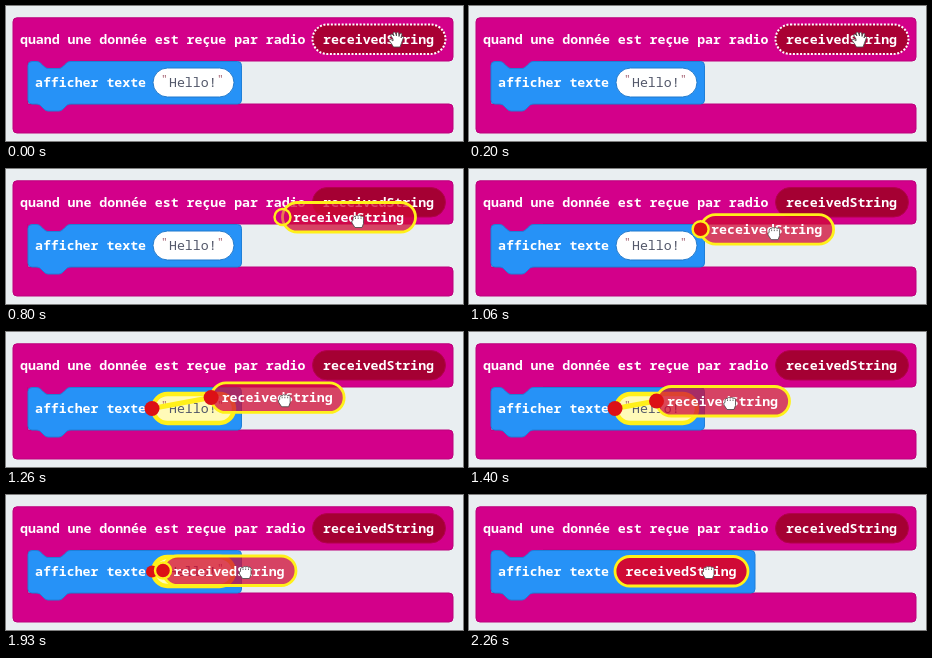
Recreate the animation shown at these times as an HTML page. Size 457 by 135 pixels, loop 2330 ms.

```html
<!DOCTYPE html>
<html lang="fr">
<head>
<meta charset="utf-8">
<style>
  html, body { margin: 0; width: 100%; height: 100%; overflow: hidden; background: #e9eef1; }
  svg { display: block; width: 457px; height: 135px; }
  text { font: 700 13.22px "Noto Sans Mono", "DejaVu Sans Mono", monospace; fill: #fff; white-space: pre; }
  .value { font-weight: 500; fill: #53586a; }
  .quote { font-size: 11px; font-weight: 400; fill: #a0596a; }
  .glow { stroke: #fff01a; }
  .hand { fill: #fff; stroke: #444; stroke-width: .8; stroke-linejoin: round; }
</style>
</head>
<body>
<svg viewBox="0 0 457 135">
  <path fill="#d3008a" stroke="#bd007c" d="M11 11.8H443q4 0 4 4V51q0 4-4 4H22V98H443q4 0 4 4V123q0 4-4 4H11q-4 0-4-4V15.8q0-4 4-4Z"/>
  <path fill="#d3008a" d="M22 54H74V66H22Z"/>
  <text x="14" y="38">quand une donnée est reçue par radio</text>
  <rect id="homePill" x="306.5" y="18.5" width="133" height="29.5" rx="14.75" fill="#a90034"/>
  <text x="317" y="38">receivedString</text>

  <path id="blue" fill="#2692f7" stroke="#1f7fd8"/>
  <text x="29" y="81">afficher texte</text>
  <g id="socket">
    <rect id="field" x="147" y="62" width="81" height="29" rx="14.5"/>
    <text class="quote" x="155" y="77">"</text>
    <text class="value" x="163" y="81">Hello!</text>
    <text class="quote" x="211" y="77">"</text>
  </g>

  <path id="link" class="glow" stroke-width="5"/>
  <circle id="goal" cx="146" cy="76.5" fill="#dc1016"/>
  <g id="drag">
    <rect id="dragPill" class="glow" x="306.5" y="18.5" width="133" height="29.5" rx="14.75" fill="#d00a36" stroke-width="2.8"/>
    <text x="317" y="38">receivedString</text>
    <circle id="plug" class="glow" cx="306.5" cy="33"/>
  </g>

  <g id="cursor">
    <path id="open" class="hand" d="M-3-1 -5-4q-1-2 1-2l2 2-1-3q1-2 2.500 0l1 3V-7q1-1.500 2.200 0l.3 3.500 1-3q1.500-1 2 .5L5-2 6-3.500q1.500-.5 1.500 1L5.500 3 4 7H-2.500L-5 3-7 .5q0-2 2-1l2 1.500Z"/>
    <path id="fist" class="hand" d="M-5-3q1-2.500 2.500-1.500 1-2 2.700-.5 1.500-1.500 2.700.3 2-1 2.600 1V2.500L4 6.500H-3L-6 2q-1-2.500 1-2.500Z M-2.500-3.500V-2M.2-3.500V-2M3-3.500V-2"/>
  </g>
</svg>
<script>
const LOOP = 2330, STEP = 1000 / 15;
const PICK = 590, FILL = 930, LINK = 1200, CLOSE = 1640, DROP = 2060;

// time, x, y
const handPath = [
  [560, 390, 34], [800, 352, 52], [1060, 306, 64],
  [1400, 261, 71], [1520, 248, 75], [1660, 239.5, 77]
];
const dragPath = [
  [590, 0, 0], [800, -30, 15], [1060, -74, 27],
  [1400, -119, 36], [1540, -137, 40], [1700, -149.5, 42.5]
];

const el = {};
document.querySelectorAll("[id]").forEach(node => el[node.id] = node);

function set(node, attrs) {
  for (const key in attrs) node.setAttribute(key, attrs[key]);
}

function show(node, on) {
  node.style.display = on ? "" : "none";
}

function pointAt(path, t) {
  if (t <= path[0][0]) return path[0].slice(1);
  const i = path.findIndex(p => p[0] > t);
  if (i < 0) return path[path.length - 1].slice(1);
  const [t0, x0, y0] = path[i - 1], [t1, x1, y1] = path[i];
  const k = (t - t0) / (t1 - t0);
  return [x0 + (x1 - x0) * k, y0 + (y1 - y0) * k];
}

function bluePath(right) {
  const notch = "H30c3 0 4 1 6 3l2 2q2 2 4 2h11q2 0 4-2l2-2c2-2 3-3 6-3";
  const tab = "H65c-3 0-4 1-6 3l-2 2q-2 2-4 2h-11q-2 0-4-2l-2-2c-2-2-3-3-6-3";
  return `M26 55.500${notch}H${right - 4}q4 0 4 4V94q0 4-4 4${tab}H26q-4 0-4-4V59.500q0-4 4-4Z`;
}

function draw(t) {
  const held = t >= PICK && t < DROP;
  const dropped = t >= DROP;
  const linked = t >= LINK && held;
  const close = t >= CLOSE;
  const [hx, hy] = pointAt(handPath, t);
  const [dx, dy] = dropped ? [-160.5, 43] : pointAt(dragPath, t);

  set(el.blue, { d: bluePath(dropped ? 286 : 235.5) });
  set(el.homePill, t < PICK
    ? { stroke: "#fff", "stroke-width": 2, "stroke-dasharray": "2 1.6", fill: "#a90034" }
    : { stroke: "#b3004d", "stroke-width": 1, "stroke-dasharray": "none", fill: "#a50033" });

  show(el.socket, !dropped);
  set(el.field, {
    fill: linked ? "#fffab8" : "#fff",
    stroke: linked ? "#fff01a" : "#2079cc",
    "stroke-width": linked ? 4.5 : 1
  });

  show(el.link, linked);
  show(el.goal, linked);
  set(el.link, { d: `M146 76.500L${306.5 + dx} ${33 + dy}` });
  set(el.goal, { r: close ? 6 : 7.5 });

  show(el.drag, t >= PICK);
  set(el.drag, { transform: `translate(${dx} ${dy})` });
  set(el.dragPill, { "fill-opacity": dropped ? 1 : 0.75 });
  show(el.plug, held);
  set(el.plug, {
    r: linked && !close ? 7.5 : 8,
    fill: t < FILL ? "#d3008a" : "#dc1016",
    "fill-opacity": t < FILL ? 0.5 : 1,
    "stroke-width": linked && !close ? 0 : 2.4
  });

  set(el.cursor, { transform: `translate(${hx} ${hy})` });
  show(el.open, t < PICK);
  show(el.fist, t >= PICK);
}

function tick(now) {
  const t = now % LOOP;
  draw(Math.floor((t + 7) / STEP) * STEP);
  requestAnimationFrame(tick);
}

draw(0);
requestAnimationFrame(tick);
</script>
</body>
</html>
```
